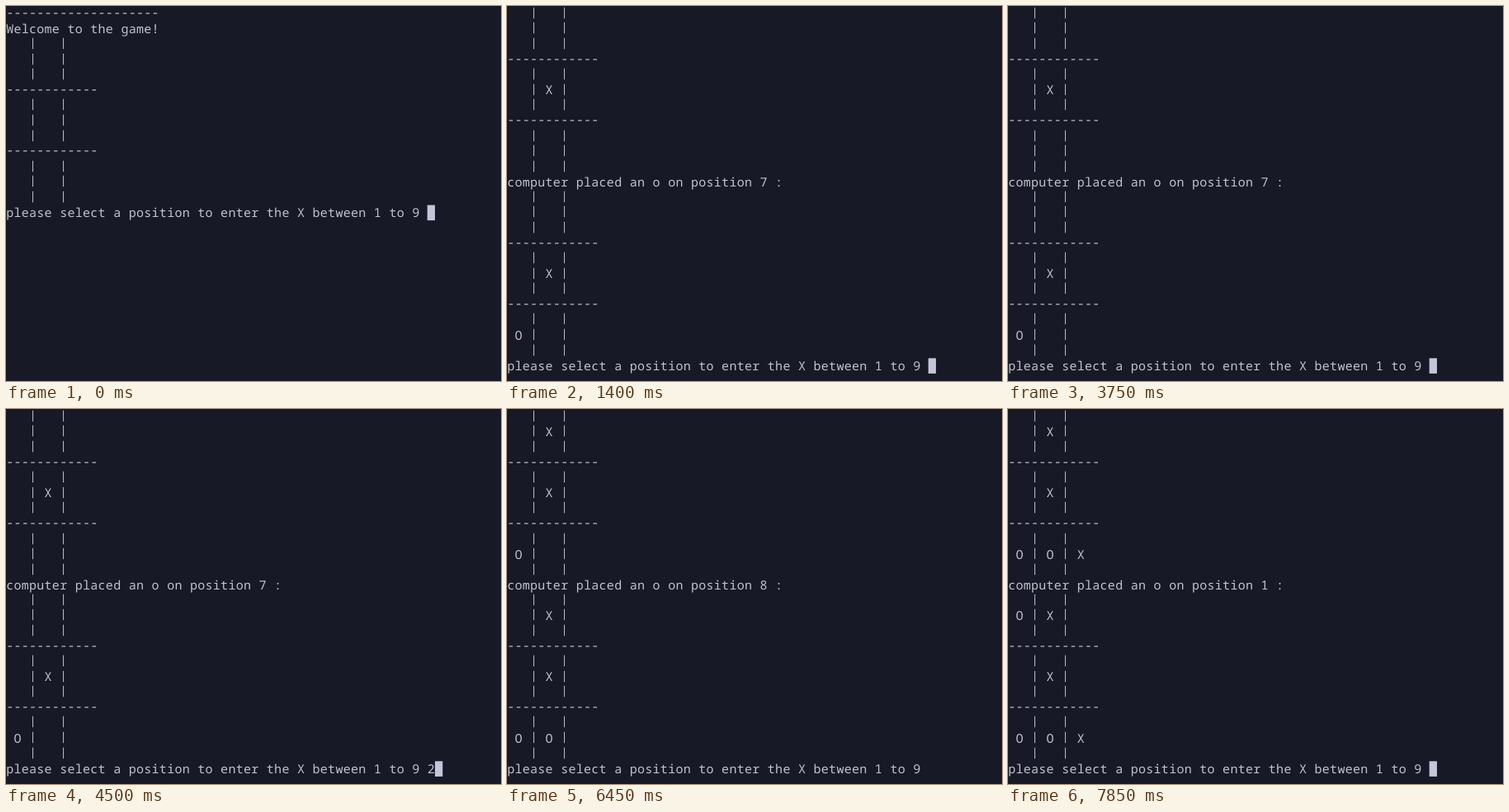
An HTML page with a canvas that plays this animation: 600x455 px, repeating every 8 s.

```html
<!DOCTYPE html>
<html lang="en">
<head>
<meta charset="utf-8">
<title>Terminal game</title>
<style>
  html, body { margin: 0; width: 100%; height: 100%; overflow: hidden; background: #171926; }
  canvas { display: block; width: 600px; height: 455px; }
</style>
</head>
<body>
<canvas id="screen" width="600" height="455"></canvas>
<script>
const ctx = document.getElementById('screen').getContext('2d');
const LOOP = 8000, CELL_W = 9.285, CELL_H = 18.58, BASELINE = 14.47;
const BG = '#171926', INK = '#c0c3d0', CURSOR = '#c3c6d8';
const FAMILY = '"Noto Sans Mono", "DejaVu Sans Mono", monospace';
const PROMPT = 'please select a position to enter the X between 1 to 9 ';

// cells: nine characters, left to right and top to bottom
function board(cells) {
  const lines = [], gap = '   |   |';
  for (let r = 0; r < 3; r++) {
    const [a, b, c] = cells.slice(r * 3, r * 3 + 3);
    if (r) lines.push('-'.repeat(12));
    lines.push(gap, ` ${a} | ${b} | ${c}`, gap);
  }
  return lines;
}

const turn = (before, pos, after) =>
  [...board(before), `computer placed an o on position ${pos} :`, ...board(after), PROMPT];

const screens = [
  { at: 0, lines: ['-'.repeat(20), 'Welcome to the game!', ...board(' '.repeat(9)), PROMPT] },
  { at: 1400, lines: turn('    X    ', 7, '    X O  ') },
  { at: 4700, lines: turn(' X  X O  ', 8, ' X  X OO ') },
  { at: 7850, lines: turn(' X  X OOX', 1, 'OX  X OOX') }
];

const typed = [
  { from: 1250, to: 1400, key: '5' },
  { from: 4500, to: 4700, key: '2' },
  { from: 7600, to: 7850, key: '9' }
];

// each time flips the cursor, which starts visible
const blinks = [550, 1150, 1950, 2550, 3150, 3750, 4350, 4450, 5250, 5850, 6450, 7050];

// size and rise above the baseline for the board's rules
const TEXT = { size: 15, lift: 0 };
const rules = { '|': { size: 13.5, lift: 2.6 }, '-': { size: 15, lift: 1.2 } };

function drawLine(text, row) {
  [...text].forEach((ch, col) => {
    if (ch === ' ') return;
    const { size, lift } = rules[ch] || TEXT;
    ctx.font = `${size}px ${FAMILY}`;
    ctx.fillText(ch, (col + 0.5) * CELL_W, row * CELL_H + BASELINE - lift);
  });
}

function draw(t) {
  const { lines } = screens.filter(s => s.at <= t).pop();
  const press = typed.find(p => t >= p.from && t < p.to);
  const last = lines.length - 1;
  const input = lines[last] + (press ? press.key : '');

  ctx.fillStyle = BG;
  ctx.fillRect(0, 0, 600, 455);
  ctx.textAlign = 'center';
  ctx.textRendering = 'geometricPrecision';
  ctx.fillStyle = INK;
  lines.slice(0, last).forEach(drawLine);
  drawLine(input, last);

  if (blinks.filter(b => b <= t).length % 2 === 0) {
    ctx.fillStyle = CURSOR;
    ctx.fillRect(input.length * CELL_W, last * CELL_H, CELL_W, CELL_H);
  }
}

const start = performance.now();
function tick() {
  draw((performance.now() - start) % LOOP);
  requestAnimationFrame(tick);
}
tick();
</script>
</body>
</html>
```
